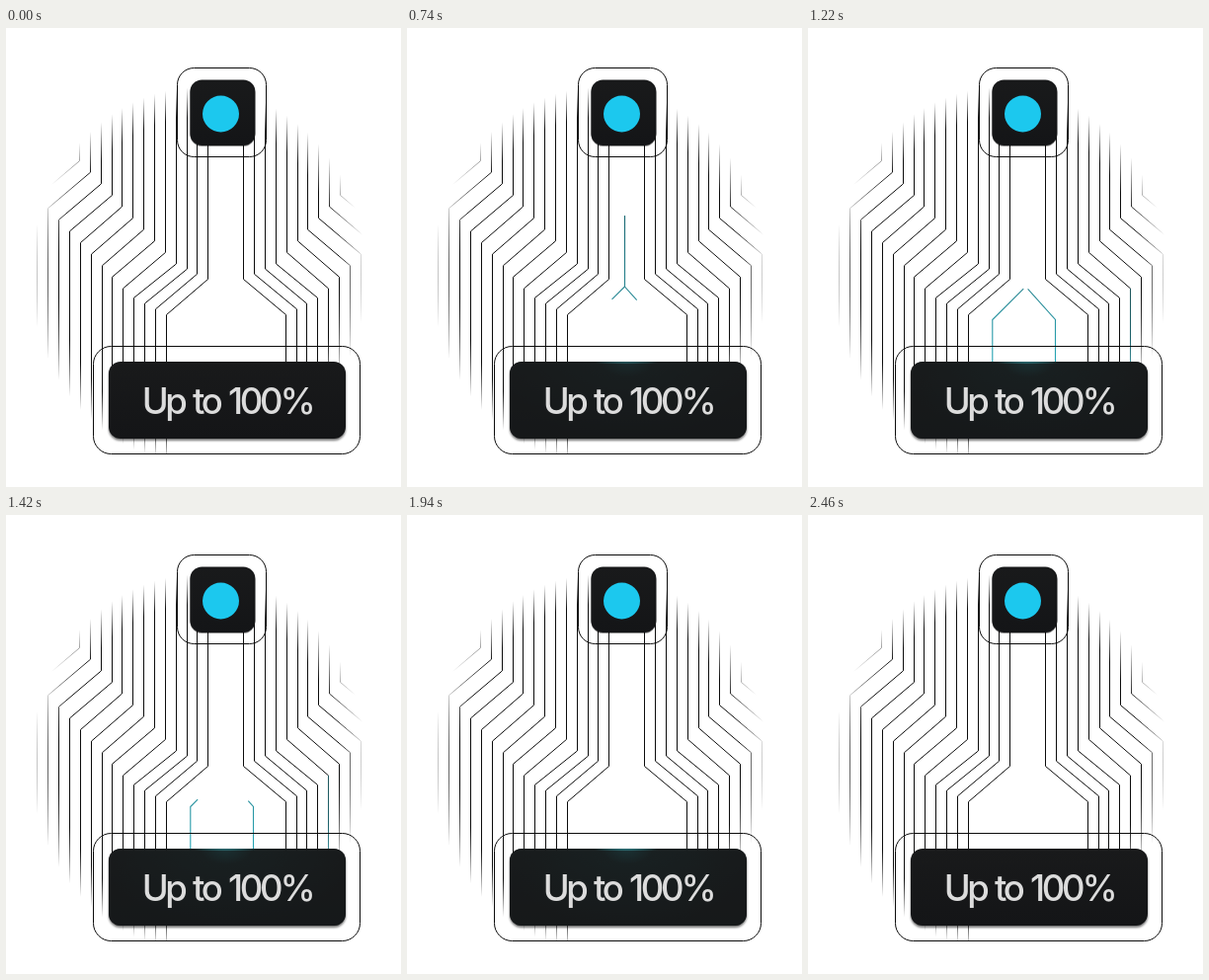
An HTML page for the animation above (2.5 s loop, 400 by 465 pixels).

```html
<!DOCTYPE html>
<html lang="en">
<head>
<meta charset="utf-8">
<title>Up to 100%</title>
<style>
  html, body { margin: 0; width: 100%; height: 100%; overflow: hidden; background: #fff; }
  svg { display: block; width: 400px; height: 465px; }
  .line { fill: none; stroke: #0c0c0c; stroke-width: 1; }
  .beam { fill: none; stroke: url(#teal); stroke-width: 1.1; }
  .card { filter: drop-shadow(0 1px .6px rgba(0, 0, 0, .45)); }
  .wide { filter: drop-shadow(0 2.5px 1px rgba(0, 0, 0, .55)); }
  text {
    font: 500 36.5px Inter, "Liberation Sans", sans-serif;
    letter-spacing: -3.3px; word-spacing: 2px; fill: #dcdcdc;
  }
</style>
</head>
<body>
<svg viewBox="0 0 400 465">
  <defs>
    <radialGradient id="fade">
      <stop offset=".84" stop-color="#fff"/>
      <stop offset="1" stop-color="#000"/>
    </radialGradient>
    <mask id="oval" maskUnits="userSpaceOnUse" x="0" y="0" width="400" height="465">
      <ellipse cx="195" cy="251" rx="170" ry="191" fill="url(#fade)"/>
    </mask>
    <linearGradient id="teal" gradientUnits="userSpaceOnUse" x1="0" y1="119" x2="0" y2="338">
      <stop offset="0" stop-color="#123c40"/>
      <stop offset=".33" stop-color="#1e6c76"/>
      <stop offset=".65" stop-color="#2d8792"/>
      <stop offset="1" stop-color="#25a5b5"/>
    </linearGradient>
    <linearGradient id="dark" x1="0" y1="0" x2="0" y2="1">
      <stop offset="0" stop-color="#191a1b"/>
      <stop offset="1" stop-color="#141517"/>
    </linearGradient>
    <radialGradient id="tint" gradientUnits="userSpaceOnUse" cx="0" cy="0" r="1"
      gradientTransform="translate(223 338) scale(130 80)">
      <stop offset="0" stop-color="#1c3c3f"/>
      <stop offset=".2" stop-color="#192324"/>
      <stop offset="1" stop-color="#181b1c"/>
    </radialGradient>
    <radialGradient id="spark">
      <stop offset="0" stop-color="#35a3ad"/>
      <stop offset="1" stop-color="#35a3ad" stop-opacity="0"/>
    </radialGradient>
  </defs>

  <g id="lines" mask="url(#oval)"></g>
  <g id="beams"></g>

  <rect class="line" x="173.5" y="40.5" width="90" height="90" rx="17"/>
  <rect class="line" x="88.5" y="322.5" width="270" height="109" rx="18"/>

  <rect class="card" x="186.4" y="52.4" width="66" height="66.6" rx="12" fill="url(#dark)"/>
  <circle cx="217.5" cy="87" r="18.5" fill="#1cc8ee"/>

  <rect class="wide" x="104" y="338" width="240" height="78" rx="12" fill="url(#dark)"/>
  <g id="glow">
    <rect x="104" y="338" width="240" height="78" rx="12" fill="url(#tint)"/>
    <ellipse cx="222" cy="339" rx="34" ry="1.6" fill="url(#spark)"/>
  </g>
  <text x="224" y="390.5" text-anchor="middle">Up to 100%</text>
</svg>
<script>
const LOOP = 2500, AXIS = 445.5;
const $ = id => document.getElementById(id);
const snap = v => Math.floor(v) + .5;

function addPath(parent, points, cls) {
  const p = document.createElementNS('http://www.w3.org/2000/svg', 'path');
  p.setAttribute('d', 'M' + points.map(q => q.join(' ')).join('L'));
  p.setAttribute('class', cls);
  parent.append(p);
  return p;
}

// Trace k counted outwards from the middle; the four inner ones sit closer.
function trace(k, right) {
  const side = x => snap(right ? AXIS - x : x);
  const top = side(204.7 - 10.85 * k), low = side(162.4 - 10.9 * k);
  const outer = 239 - 11.6 * (k - 3);
  const bend = k < 4 ? 254.5 - 5.2 * k : outer;
  const foot = k < 4 ? 290.5 - 5.7 * k : outer + 36.5;
  return [[top, 54], [top, bend], [low, foot], [low, 431]];
}

for (let k = 0; k < 13; k++) {
  addPath($('lines'), trace(k, false), 'line');
  addPath($('lines'), trace(k, true), 'line');
}

const beams = [186.8, 250.5].map(x =>
  addPath($('beams'), [[220.5, 119], [220.5, 262], [x, 295.5], [x, 338]], 'beam'));
const [foot, end] = trace(4, true).slice(2);
const sideBeam = addPath($('beams'), [foot, [end[0], 338]], 'beam');

// Linear interpolation through [time, value] steps.
function at(steps, t) {
  const i = steps.findIndex(s => s[0] > t);
  if (i < 0) return steps[steps.length - 1][1];
  if (i === 0) return steps[0][1];
  const [t0, a] = steps[i - 1], [t1, b] = steps[i];
  return a + (b - a) * (t - t0) / (t1 - t0);
}

const head = [[52, 0], [360, 72], [740, 161], [1045, 240]];
const tail = [[300, 0], [740, 71], [1220, 146], [1420, 180], [1740, 240]];
const sideFade = [[900, 0], [1150, .6], [1450, .6], [1650, 0]];
const glowFade = [[460, 0], [740, .5], [1100, .65], [1500, .65], [1900, .8], [2300, 0]];

function draw(now) {
  const t = now % LOOP;
  const from = at(tail, t), len = Math.max(0, at(head, t) - from);
  for (const b of beams) {
    b.style.strokeDasharray = `${len} 600`;
    b.style.strokeDashoffset = -from;
    b.style.visibility = len > 0 ? 'visible' : 'hidden';
  }
  sideBeam.style.opacity = at(sideFade, t);
  $('glow').style.opacity = at(glowFade, t);
}

const start = performance.now();
function tick() {
  draw(performance.now() - start);
  requestAnimationFrame(tick);
}
tick();
</script>
</body>
</html>
```
